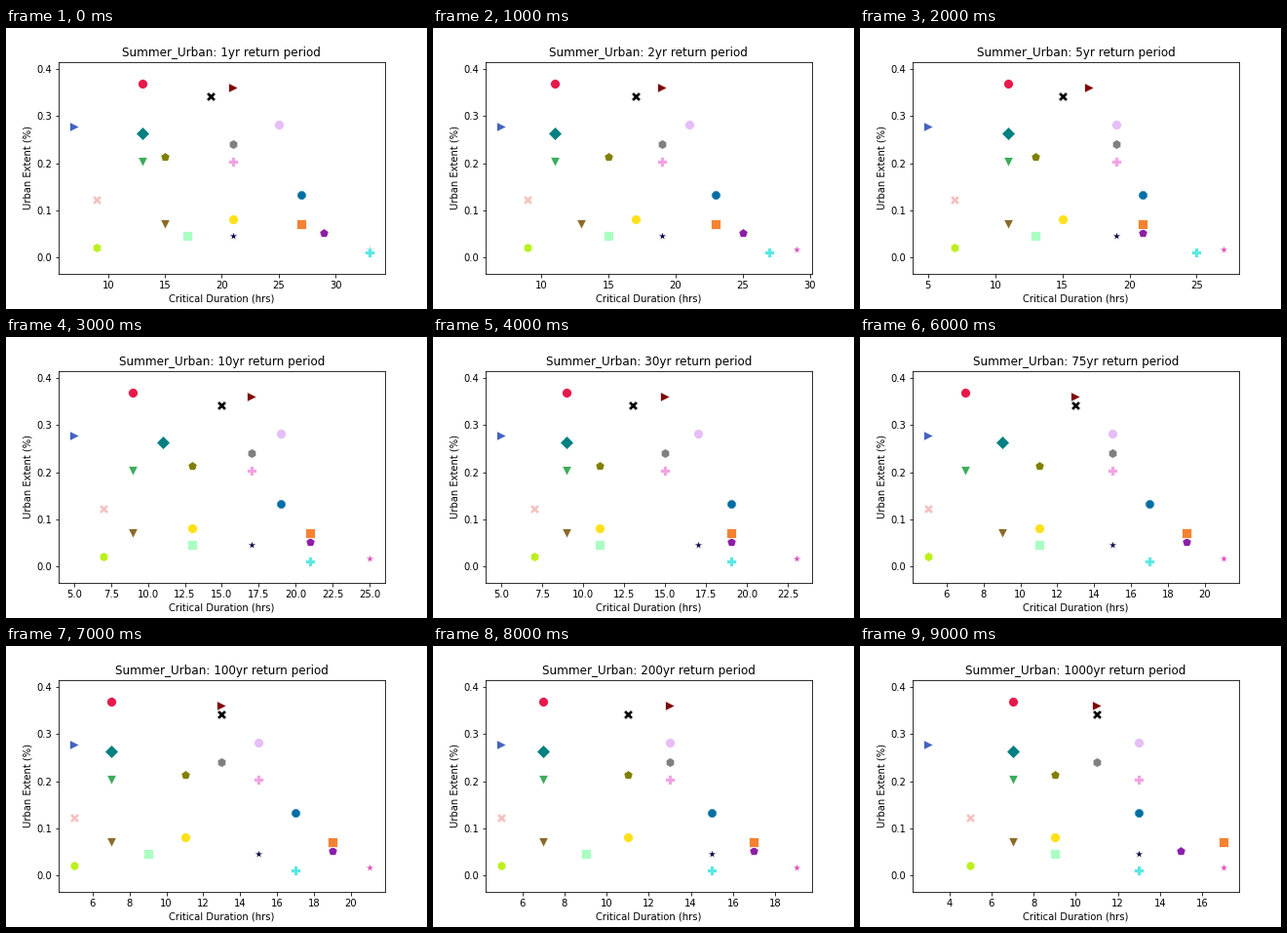
A matplotlib script for the animation above (10 s loop, 432 px wide and 288 px high).

```python
import math

import matplotlib.pyplot as plt
from matplotlib.animation import FuncAnimation

PERIODS = [1, 2, 5, 10, 30, 50, 75, 100, 200, 1000]

# marker, colour, urban extent, 1yr duration, total fall, bend of the fall
SITES = [
    ("*", "#e255bd", 0.0168, 33, 7.85, 0.60),
    ("P", "#5ae8e2", 0.0095, 33, 10.41, 0.58),
    ("h", "#bcf01c", 0.0200, 9, 2.34, 0.70),
    ("v", "#8c6a28", 0.0700, 15, 4.39, 0.50),
    ("s", "#aaffc3", 0.0450, 17, 4.49, 0.61),
    ("*", "#10104c", 0.0450, 21, 3.86, 0.65),
    ("p", "#8c1ea8", 0.0520, 29, 6.52, 0.42),
    ("s", "#f58231", 0.0715, 27, 5.37, 0.50),
    ("o", "#ffe119", 0.0805, 21, 6.05, 0.40),
    ("8", "#006ea4", 0.1325, 27, 6.55, 0.55),
    ("X", "#f3c2c0", 0.1215, 9, 2.34, 0.70),
    ("P", "#f3a2e4", 0.2025, 21, 4.48, 0.76),
    ("v", "#3cac5c", 0.2030, 13, 3.499, 0.59),
    ("p", "#808000", 0.2145, 15, 2.80, 0.75),
    ("h", "#808080", 0.2415, 21, 5.05, 0.85),
    ("D", "#008080", 0.2625, 13, 3.40, 0.75),
    (">", "#4363c0", 0.2770, 7, 1.60, 0.60),
    ("o", "#e6bef8", 0.2820, 25, 6.48, 0.60),
    ("X", "#000000", 0.3425, 19, 4.26, 0.60),
    (">", "#800808", 0.3605, 21, 5.26, 0.75),
    ("o", "#e6194b", 0.3695, 13, 3.499, 0.59),
]

fig, ax = plt.subplots(figsize=(6, 4), dpi=72)
fig.subplots_adjust(bottom=0.125)


def duration(start, fall, bend, period):
    """Odd number of hours, shrinking with the log of the return period."""
    rarity = math.log(period) / math.log(PERIODS[-1])
    return start - 2 * round(fall * rarity ** bend)


def draw(step):
    ax.clear()
    period = PERIODS[step]
    hours = []
    for marker, color, extent, *fall in SITES:
        hours.append(duration(*fall, period))
        ax.scatter(hours[-1], extent, s=100, marker=marker, color=color,
                   edgecolors="white", linewidths=0.8)

    low, high = min(hours) - 0.04, max(hours) + 0.04
    pad = 0.05 * (high - low)
    ax.set_xlim(low - pad, high + pad)
    ax.set_yticks([0.0, 0.1, 0.2, 0.3, 0.4])
    ax.set_ylim(-0.0352, 0.4155)
    ax.set_title(f"Summer_Urban: {period}yr return period")
    ax.set_xlabel("Critical Duration (hrs)")
    ax.set_ylabel("Urban Extent (%)")
    return []


anim = FuncAnimation(fig, draw, frames=len(PERIODS), interval=1000,
                     init_func=lambda: draw(0), repeat=True)
plt.show()
```
